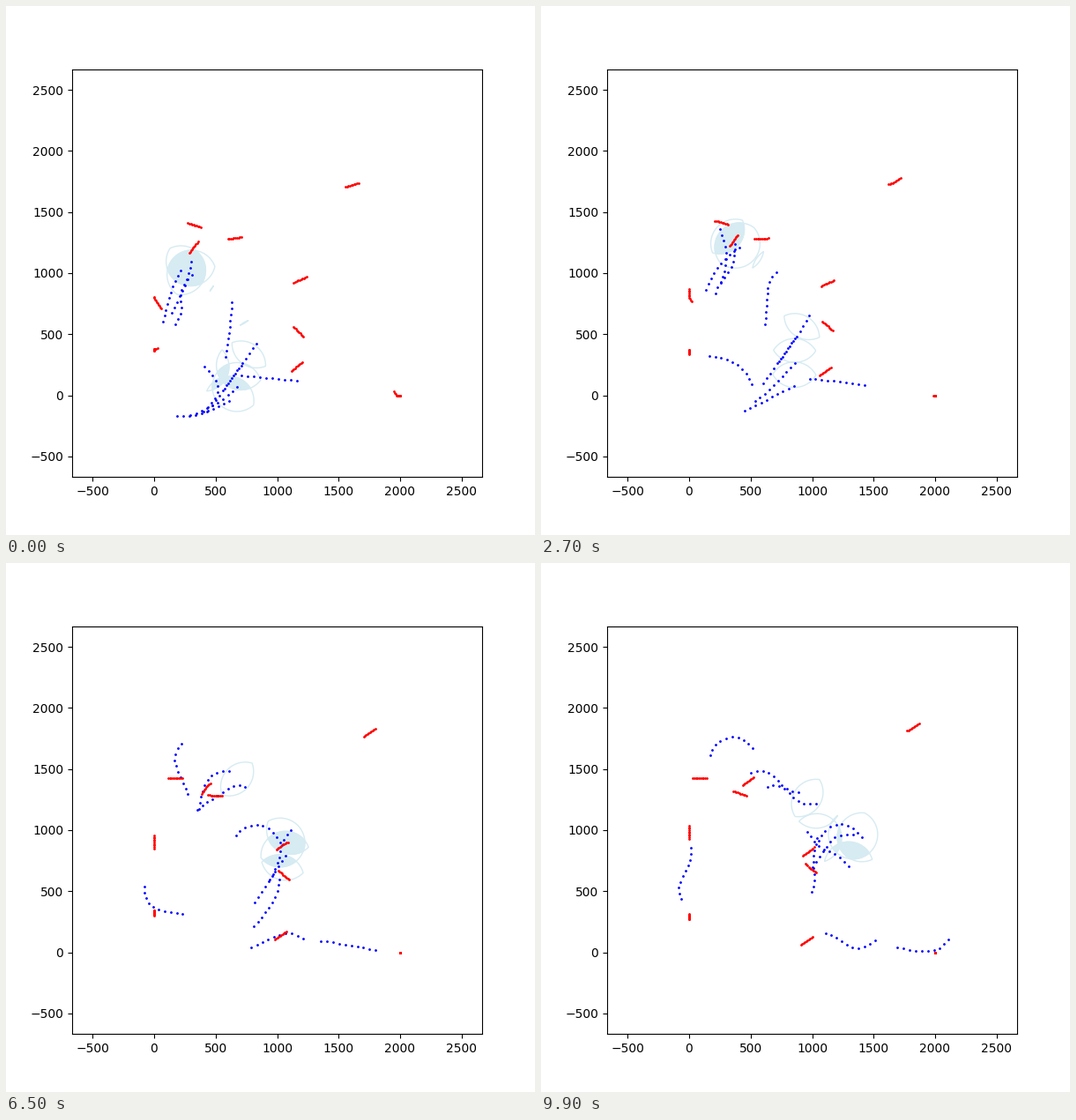
A matplotlib script that plays this animation: 600x600 px, repeating every 10 s.

```python
from itertools import combinations

import matplotlib.pyplot as plt
import numpy as np
from matplotlib.animation import FuncAnimation
from matplotlib.collections import PolyCollection

FRAMES = 100
GAP, DOTS = 5, 10            # a trail dot every GAP frames
LEAD = GAP * (DOTS - 1)      # frames of history before the start
STEPS = FRAMES + LEAD
WORLD = 2000
RADIUS = 200
PALE = "#d6ebf2"

# A few turning points per agent; a curve at constant speed joins them
flyers = [
    [(75, 603), (194, 985), (308, 1130), (545, 1303), (680, 1367),
     (781, 1335), (895, 1233), (1032, 1216)],
    [(143, 675), (295, 1210), (201, 1462), (166, 1580), (251, 1730),
     (401, 1757), (518, 1670)],
    [(172, 580), (219, 690), (214, 840), (330, 1025), (385, 1290),
     (502, 1466), (645, 1469), (788, 1342), (889, 1310)],
    [(581, 315), (631, 762), (688, 986), (824, 1043), (961, 986),
     (1054, 868), (1183, 805), (1297, 704)],
    [(574, 57), (830, 420), (1015, 770), (1075, 957), (1190, 1043),
     (1310, 1030), (1405, 942)],
    [(440, -122), (867, 481), (1011, 704), (1100, 838), (1190, 942),
     (1333, 964)],
    [(295, -165), (538, -46), (738, 134), (932, 365), (1018, 580),
     (1011, 718), (1039, 935)],
    [(710, 163), (1692, 40), (1940, 12), (2037, 37), (2107, 106)],
    [(186, -169), (330, -162), (609, -46), (961, 120), (1104, 156),
     (1197, 120), (1326, 40), (1426, 48), (1512, 98)],
    [(400, -130), (516, 30), (416, 228), (179, 322), (-7, 372), (-84, 510),
     (-7, 711), (14, 855)],
]
# Walkers go in straight legs and slide along the walls of the world
walkers = [
    [(380, 1375), (235, 1425), (30, 1425)],
    [(290, 1165), (430, 1365), (525, 1435)],
    [(710, 1295), (600, 1280), (470, 1280), (360, 1320)],
    [(1555, 1705), (1665, 1740), (1745, 1795), (1870, 1870)],
    [(1240, 970), (1045, 882), (925, 790)],
    [(1215, 480), (1135, 560), (945, 725)],
    [(1205, 270), (1080, 175), (910, 60)],
    [(55, 710), (0, 800), (-90, 1035)],
    [(30, 385), (-80, 365), (-311, 270)],
    [(1950, 30), (2150, -270)],
]


def lengths(p):
    return np.r_[0, np.cumsum(np.hypot(*np.diff(p, axis=0).T))]


def smooth(points):
    """Natural cubic spline through the points, finely sampled."""
    p = np.array(points, float)
    u = lengths(p)
    h = np.diff(u)
    n = len(p)
    m, rhs = np.eye(n), np.zeros((n, 2))
    slope = np.diff(p, axis=0) / h[:, None]
    for i in range(1, n - 1):
        m[i, i - 1:i + 2] = h[i - 1], 2 * (h[i - 1] + h[i]), h[i]
        rhs[i] = 6 * (slope[i] - slope[i - 1])
    k = np.linalg.solve(m, rhs)
    s = np.linspace(0, u[-1], 1500)
    i = np.clip(np.searchsorted(u, s) - 1, 0, n - 2)
    a, b, w = (u[i + 1] - s)[:, None], (s - u[i])[:, None], h[i][:, None]
    return ((k[i] * a**3 + k[i + 1] * b**3) / (6 * w)
            + (p[i] / w - k[i] * w / 6) * a
            + (p[i + 1] / w - k[i + 1] * w / 6) * b)


def pace(curve):
    """Positions at constant speed, one per frame."""
    p = np.array(curve, float)
    u = lengths(p)
    s = np.linspace(0, u[-1], STEPS)
    return np.c_[np.interp(s, u, p[:, 0]), np.interp(s, u, p[:, 1])]


blue = np.array([pace(smooth(p)) for p in flyers])
red = np.clip([pace(p) for p in walkers], 0, WORLD)

angle = np.linspace(0, 2 * np.pi, 720, endpoint=False)
RIM = RADIUS * np.c_[np.cos(angle), np.sin(angle)]


def distances(a, b):
    return np.hypot(*(a[:, None] - b).transpose(2, 0, 1))


def overlap(centers):
    """Boundary of the area shared by discs at the given centers."""
    edge = np.concatenate([c + RIM for c in centers])
    edge = edge[(distances(edge, centers) <= RADIUS + 1e-6).all(axis=1)]
    d = edge - edge.mean(axis=0) if len(edge) else edge
    return edge[np.argsort(np.arctan2(d[:, 1], d[:, 0]))]


def shared(heads, count):
    near = distances(heads, heads) < 2 * RADIUS
    groups = [list(g) for g in combinations(range(len(heads)), count)
              if all(near[pair] for pair in combinations(g, 2))]
    shapes = [overlap(heads[g]) for g in groups]
    return [s for s in shapes if len(s) > 2]


fig, ax = plt.subplots(figsize=(6, 6), dpi=100)
ax.set_xlim(-WORLD / 3, WORLD * 4 / 3)
ax.set_ylim(-WORLD / 3, WORLD * 4 / 3)

fills = PolyCollection([], facecolors=PALE, edgecolors="none", zorder=1)
rims = PolyCollection([], facecolors="none", edgecolors=PALE, linewidths=1,
                      zorder=1)
ax.add_collection(fills, autolim=False)
ax.add_collection(rims, autolim=False)
blue_dots, = ax.plot([], [], "bo", markersize=1)
red_dots, = ax.plot([], [], "ro", markersize=1)


def update(frame):
    now = frame + LEAD
    trail = now - GAP * np.arange(DOTS)
    for dots, tracks in ((blue_dots, blue), (red_dots, red)):
        dots.set_data(*tracks[:, trail].reshape(-1, 2).T)
    heads = blue[:, now]
    rims.set_verts(shared(heads, 2))
    fills.set_verts(shared(heads, 3))
    return fills, rims, blue_dots, red_dots


anim = FuncAnimation(fig, update, frames=FRAMES, interval=100,
                     init_func=lambda: update(0), repeat=True, repeat_delay=0)
plt.show()
```
